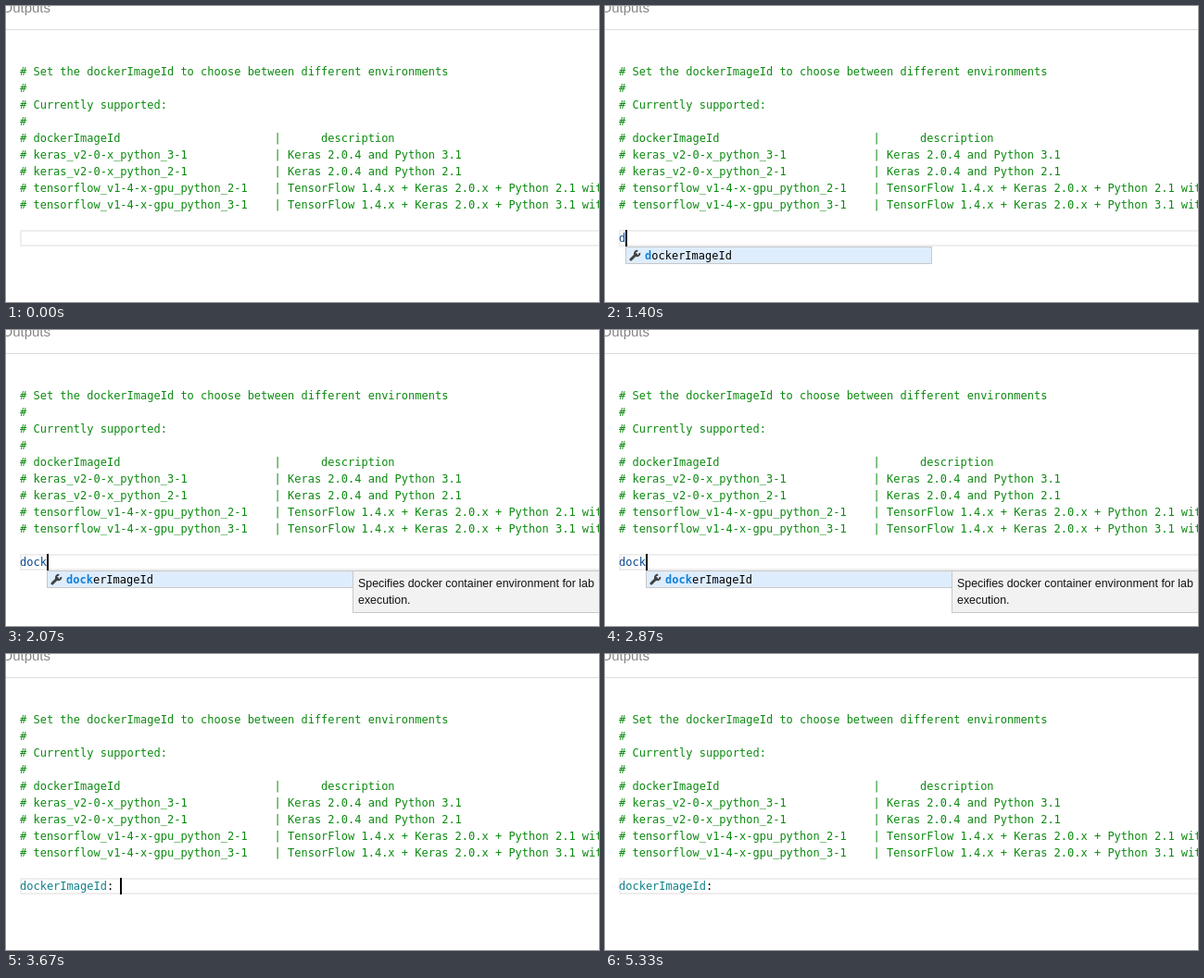
These frames come from a looping animation (640 px wide and 320 px high, 5390 ms). An HTML page:

```html
<!DOCTYPE html>
<html lang="en">
<head>
<meta charset="utf-8">
<title>Editor autocomplete</title>
<style>
  html, body { margin: 0; width: 100%; height: 100%; overflow: hidden; background: #fff; }
  #stage { position: relative; width: 640px; height: 320px; overflow: hidden; background: #fff; }
  #stage > *, #popup > * { position: absolute; }
  .code { margin: 0; font: 12px/18px "DejaVu Sans Mono", monospace; white-space: pre; }
  #title { left: -4.5px; top: -7px; font: 15px/18px "Liberation Sans", Arial, sans-serif; color: #858585; }
  #rule { left: 0; top: 25px; width: 640px; height: 1px; background: #dcdcdc; }
  #comments { left: 15px; top: 62px; color: #0c8a10; }
  #current { left: 15px; top: 242px; width: 640px; height: 18px; box-sizing: border-box; border: 2px solid #eee; }
  #line { left: 15px; top: 242px; color: #0b4a8f; }
  #line.done { color: #0e8088; }
  #line i { font-style: normal; color: #000; }
  #cursor { top: 242px; width: 2px; height: 18px; background: #000; }
  #popup { top: 260px; }
  #row { left: 0; top: 0; width: 331px; height: 19px; box-sizing: border-box; border: 1px solid #c8c8c8; background: #deedfd; }
  #icon { left: 4px; top: 3px; }
  #label { left: 21px; top: 1px; color: #000; }
  #label b { color: #1080d8; }
  #tip {
    left: 330px; top: 0; width: 330px; height: 46px; box-sizing: border-box; padding: 4px 5px;
    border: 1px solid #c8c8c8; background: #f2f2f3; color: #111;
    font: 12.4px/18px "Liberation Sans", Arial, sans-serif; white-space: pre;
  }
</style>
</head>
<body>
<div id="stage">
  <div id="title">Outputs</div>
  <div id="rule"></div>
  <pre id="comments" class="code"># Set the dockerImageId to choose between different environments
#
# Currently supported:
#
# dockerImageId                       |      description
# keras_v2-0-x_python_3-1             | Keras 2.0.4 and Python 3.1
# keras_v2-0-x_python_2-1             | Keras 2.0.4 and Python 2.1
# tensorflow_v1-4-x-gpu_python_2-1    | TensorFlow 1.4.x + Keras 2.0.x + Python 2.1 with
# tensorflow_v1-4-x-gpu_python_3-1    | TensorFlow 1.4.x + Keras 2.0.x + Python 3.1 with</pre>
  <div id="current"></div>
  <div id="line" class="code"></div>
  <div id="popup">
    <div id="row"></div>
    <svg id="icon" width="13" height="13" viewBox="0 0 13 13">
      <path d="M2 11 L7.5 5.5" stroke="#424242" stroke-width="3" stroke-linecap="round"/>
      <path d="M9.3 1.9 A2.7 2.7 0 1 0 11.3 4" fill="none" stroke="#424242" stroke-width="2"/>
    </svg>
    <div id="label" class="code"></div>
    <div id="tip">Specifies docker container environment for lab
execution.</div>
  </div>
  <div id="cursor"></div>
</div>
<script>
  const LOOP = 5390, CHAR = 7.224, LEFT = 15, WORD = "dockerImageId";
  const ACCEPT = 3670, TIP = 1530;
  // Time, letters typed, letters highlighted in the list
  const STEPS = [
    [130, 0, 0], [1330, 1, 0], [1400, 1, 1], [1470, 2, 1], [1530, 2, 2],
    [1600, 3, 2], [1670, 3, 3], [1740, 4, 3], [1800, 4, 4], [ACCEPT, 15, 0]
  ];
  const $ = id => document.getElementById(id);
  const line = $("line"), label = $("label"), popup = $("popup"), cursor = $("cursor"), tip = $("tip");
  const show = (el, on) => { el.style.visibility = on ? "visible" : "hidden"; };
  let last = null;

  function setStep(step) {
    if (step === last) return;
    last = step;
    const [, typed, marked] = step;
    const done = typed > WORD.length;
    line.className = done ? "code done" : "code";
    line.innerHTML = done ? WORD + "<i>:</i>" : WORD.slice(0, typed);
    label.innerHTML = `<b>${WORD.slice(0, marked)}</b>${WORD.slice(marked)}`;
    const x = Math.round(LEFT + typed * CHAR);
    cursor.style.left = popup.style.left = x + "px";
    popup.style.display = marked ? "block" : "none";
  }

  function draw(t) {
    const step = STEPS.findLast(s => s[0] <= t) || STEPS[0];
    setStep(step);
    // The blink restarts with every key press
    const key = STEPS.find(s => s[1] === step[1])[0];
    show(cursor, (t - key + 1000) % 1000 < 500);
    show(tip, t >= TIP);
  }

  const start = performance.now();
  function tick() {
    draw((performance.now() - start) % LOOP);
    requestAnimationFrame(tick);
  }
  tick();
</script>
</body>
</html>
```
